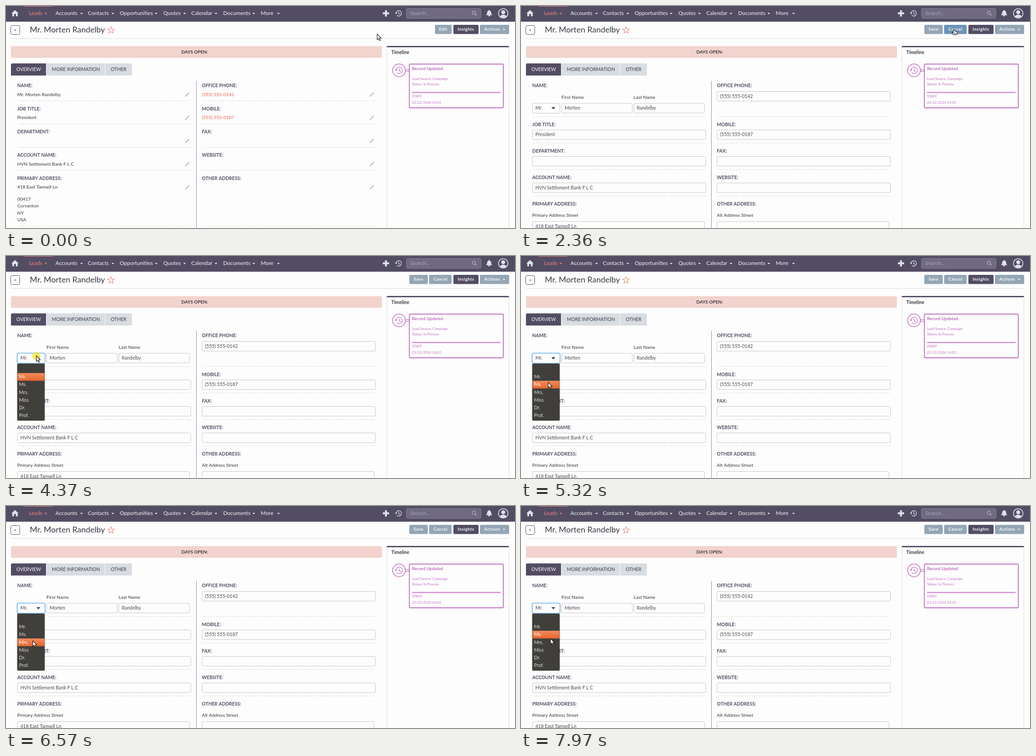
An HTML page with a canvas that plays this animation: 1132 by 495 pixels, repeating every 8 s.

```html
<!DOCTYPE html>
<html lang="en">
<head>
<meta charset="utf-8">
<title>Lead record</title>
<style>
html, body { margin: 0; width: 100%; height: 100%; overflow: hidden; background: #fdfdfd; }
canvas { display: block; width: 1132px; height: 495px; }
</style>
</head>
<body>
<canvas id="stage"></canvas>
<script>
const W = 1132, H = 495, LOOP = 8000;
const canvas = document.getElementById('stage');
const c = canvas.getContext('2d');
const dpr = window.devicePixelRatio || 1;
canvas.width = W * dpr;
canvas.height = H * dpr;

const PAGE = '#fdfdfd', DARK = '#534d64', TEXT = '#36343c', CORAL = '#f08377';
const GREY = '#94a6b5', HOVER = '#6c94b8', PURPLE = '#c06cbf', LIGHT = '#dfe1ea';
const FIRST = 'Morten', LAST = 'Randelby', FULL = `Mr. ${FIRST} ${LAST}`;
const OFFICE = '(555) 555-0142', MOBILE = '(555) 555-0187';
const COMPANY = 'HVN Settlement Bank F L C', STREET = '418 East Tamsell Ln';

const EDIT_AT = 2360, OPEN_AT = 4370;
const CLICKS = [[1620, 1670], [4340, 4450]];
const LIST_TOP = 243.8, ROW = 17.2;
const TITLES = ['', 'Mr.', 'Ms.', 'Mrs.', 'Miss', 'Dr.', 'Prof.'];

// Pointer keys: time, x, y
const PATH = [
  [1000, 825, 62], [1040, 829, 62], [1080, 854, 61], [1120, 878, 61], [1160, 889, 60],
  [1230, 914, 57], [1310, 934, 55], [1390, 951, 53], [1460, 963, 52],
  [2940, 963, 52], [3000, 938, 56], [3060, 860, 67], [3100, 769, 82], [3150, 626, 120],
  [3180, 586, 130], [3210, 503, 143], [3300, 412, 160], [3400, 317, 175],
  [3500, 230, 188], [3600, 160, 200], [3740, 98, 210], [4040, 67, 222],
  [4750, 67, 222], [5000, 64, 250], [5320, 60, 281],
  [5850, 60, 281], [6200, 61, 348], [6280, 61, 348], [6570, 59, 300], [6650, 60, 286],
  [6860, 62, 267], [6920, 62, 267], [7480, 65, 348], [7530, 65, 350], [7970, 65, 295]
];

function pointerAt(t) {
  const i = PATH.findIndex(k => k[0] > t);
  if (i === 0) return PATH[0].slice(1);
  if (i < 0) return PATH[PATH.length - 1].slice(1);
  const [t0, x0, y0] = PATH[i - 1], [t1, x1, y1] = PATH[i];
  const f = (t - t0) / (t1 - t0);
  return [Math.round(x0 + (x1 - x0) * f), Math.round(y0 + (y1 - y0) * f)];
}

// Text is placed by the middle of its capitals
function text(str, x, cy, size = 10.34, color = TEXT, style = '', gap = 0) {
  c.font = `${style} ${size}px Lato, "Open Sans", sans-serif`;
  c.letterSpacing = gap + 'px';
  c.fillStyle = color;
  c.fillText(str, x, cy + size * 0.36);
}

function box(x, y, w, h, r, fill, stroke, lw = 1) {
  c.beginPath();
  c.roundRect(x, y, w, h, r);
  if (fill) { c.fillStyle = fill; c.fill(); }
  if (stroke) { c.strokeStyle = stroke; c.lineWidth = lw; c.stroke(); }
}

function rect(x, y, w, h, color) {
  c.fillStyle = color;
  c.fillRect(x, y, w, h);
}

function disc(x, y, r, color) {
  c.beginPath();
  c.arc(x, y, r, 0, 7);
  c.fillStyle = color;
  c.fill();
}

function line(points, color, lw = 1) {
  c.beginPath();
  points.forEach(p => c.lineTo(...p));
  c.strokeStyle = color;
  c.lineWidth = lw;
  c.stroke();
}

function poly(points, fill, stroke, lw = 1) {
  c.beginPath();
  points.forEach(p => c.lineTo(...p));
  c.closePath();
  if (fill) { c.fillStyle = fill; c.fill(); }
  if (stroke) { c.strokeStyle = stroke; c.lineWidth = lw; c.stroke(); }
}

function caret(x, y, color, w = 6, h = 3.2) {
  poly([[x - w / 2, y - h / 2], [x + w / 2, y - h / 2], [x, y + h / 2]], color);
}

function historyIcon(x, y, r, color, lw) {
  c.beginPath();
  c.arc(x, y, r, -2.9, 2.4);
  c.strokeStyle = color;
  c.lineWidth = lw;
  c.stroke();
  poly([[x - r - 2.6, y - 1.6], [x - r + 2.6, y - 1.6], [x - r, y + 1.8]], color);
  line([[x, y - r * 0.55], [x, y + 0.6], [x + r * 0.5, y + r * 0.4]], color, lw);
}

function dots(x, y) {
  c.setLineDash([1, 4]);
  line([[x, y], [x + 382, y]], '#8a8a8e');
  c.setLineDash([]);
}

function pencil(x, y) {
  line([[x - 3.5, y + 3.5], [x + 2, y - 2]], '#b9b9bd', 2.2);
  line([[x + 2.4, y - 2.4], [x + 4, y - 4]], '#a5a5aa', 2.2);
  line([[x - 4.5, y + 4.5], [x - 3, y + 3]], '#8f8f95', 1);
}

function input(x, y, w, value = '') {
  box(x + 0.5, y + 0.5, w - 1, 21.5, 2.5, PAGE, '#c6c6ca');
  text(value, x + 7, y + 11, 10.5, '#4a4850');
}

function button(label, x, w, tx, color) {
  box(x, 42, w, 20.5, 2.5, color);
  text(label, tx, 52, 9.6, '#fafafa', 'bold', 0.45);
}

function navBar() {
  rect(0, 0, W, 35, DARK);
  rect(39, 0, 65, 1, CORAL);
  poly([[12, 16.5], [20, 9], [28, 16.5], [26, 16.5], [26, 23], [22, 23], [22, 18],
    [18, 18], [18, 23], [14, 23], [14, 16.5]], LIGHT);
  const items = [['Leads', 51, 88.5], ['Accounts', 110, 168], ['Contacts', 182, 237.5],
    ['Opportunities', 253, 334], ['Quotes', 350, 397], ['Calendar', 412, 467],
    ['Documents', 483, 551], ['More', 566.5, 606]];
  items.forEach(([label, x, cx], i) => {
    const color = i ? '#f5f5f7' : CORAL;
    text(label, x, 16, 12, color);
    caret(cx, 17, color);
  });
  rect(838, 14.2, 14, 4.2, LIGHT);
  rect(842.9, 9.5, 4.2, 14, LIGHT);
  historyIcon(873.5, 16.5, 6, LIGHT, 1.4);
  box(890.5, 5.5, 166, 22, 3, '#6f6a80', '#858095');
  text('Search...', 899, 16, 12, '#aaa6b5');
  c.beginPath();
  c.arc(1040.5, 15, 3.6, 0, 7);
  c.strokeStyle = '#aaa6b5';
  c.lineWidth = 1.6;
  c.stroke();
  line([[1043, 17.8], [1046.5, 21]], '#aaa6b5', 2);
  // bell
  c.beginPath();
  c.moveTo(1067.5, 20.5);
  c.quadraticCurveTo(1070, 18.5, 1070, 15);
  c.bezierCurveTo(1070, 8.5, 1079, 8.5, 1079, 15);
  c.quadraticCurveTo(1079, 18.5, 1081.5, 20.5);
  c.closePath();
  c.fillStyle = LIGHT;
  c.fill();
  disc(1074.5, 10.3, 1.3, LIGHT);
  disc(1074.5, 21.6, 1.8, LIGHT);
  // account badge
  disc(1105.8, 16.5, 11.3, LIGHT);
  disc(1105.8, 16.5, 9.7, DARK);
  c.save();
  c.beginPath();
  c.arc(1105.8, 16.5, 9.7, 0, 7);
  c.clip();
  disc(1105.8, 13.8, 4.4, LIGHT);
  c.beginPath();
  c.ellipse(1105.8, 25.2, 7.8, 6, 0, 0, 7);
  c.fill();
  c.restore();
}

function header(t, [px, py]) {
  box(10.5, 43.5, 20, 20, 3, PAGE, DARK);
  text('<', 17.3, 53, 10.3, DARK, 'bold');
  text(FULL, 53, 52.5, 17.9, '#3a3842');
  const star = [];
  for (let i = 0; i < 10; i++) {
    const r = i % 2 ? 3.3 : 7.8, a = i * Math.PI / 5 - Math.PI / 2;
    star.push([233.5 + r * Math.cos(a), 54 + r * Math.sin(a)]);
  }
  poly(star, null, CORAL, 1.1);
  rect(11, 72, 1108, 1, '#dcdce0');

  const live = t < EDIT_AT ? [['Edit', 954, 37, 963]]
    : [['Save', 897, 41, 906.5], ['Cancel', 941, 50, 950.5]];
  let over = false;
  live.forEach(([label, x, w, tx]) => {
    const hit = px >= x && px < x + w && py >= 42 && py < 62.5;
    over = over || hit;
    button(label, x, w, tx, hit ? HOVER : GREY);
  });
  button('Insights', 995, 56, 1004.5, DARK);
  button('Actions', 1054, 65, 1063.5, GREY);
  caret(1107.5, 52.5, '#fafafa', 5, 2.8);
  return over;
}

function timeline() {
  rect(846.5, 92, 1, H - 92, '#dcdce2');
  rect(1118, 92, 1, H - 92, '#dcdce2');
  box(846.5, 89, 272.5, 3, [3, 3, 0, 0], DARK);
  text('Timeline', 857, 103.5, 10.4, '#3a3842', 'bold');
  c.beginPath();
  c.arc(874, 143.5, 14.2, 0, 7);
  c.strokeStyle = PURPLE;
  c.lineWidth = 1.5;
  c.stroke();
  historyIcon(874.5, 143.5, 7.2, PURPLE, 1.2);
  line([[888, 142], [897, 142]], PURPLE, 1.3);
  line([[888, 145.6], [897, 145.6]], PURPLE, 1.3);
  box(897, 129.5, 209, 97.5, 2, null, PURPLE, 1.8);
  text('Record Updated', 903, 140, 9.6, PURPLE, 'bold');
  text('Lead Source: Campaign', 903, 162, 7.8, PURPLE);
  text('Status: In Process', 903, 174, 7.8, PURPLE);
  rect(903, 191.6, 197, 2.6, '#d08fd0');
  text('STAFF', 903, 201.5, 7.8, PURPLE);
  text('03/22/2024 14:03', 903, 215.5, 7.8, PURPLE, 'italic');
}

function panelTop() {
  box(11, 89.5, 825, 26, 3, '#f2d3cd');
  text('DAYS OPEN:', 390, 102, 10.2, '#3d3a45', 'bold');
  box(11, 128, 78, 27, [3, 0, 0, 0], DARK);
  text('OVERVIEW', 23, 141, 10.5, '#fafafa');
  rect(90, 128, 130, 27, '#d8dde1');
  text('MORE INFORMATION', 102, 141, 10.5, '#3d3a45');
  box(221, 128, 59, 27, [0, 3, 0, 0], '#d8dde1');
  text('OTHER', 233, 141, 10.5, '#3d3a45');
  rect(423, 167, 1, H - 167, '#8d8b95');
}

const LABELS = [['NAME:', 'OFFICE PHONE:'], ['JOB TITLE:', 'MOBILE:'],
  ['DEPARTMENT:', 'FAX:'], ['ACCOUNT NAME:', 'WEBSITE:'],
  ['PRIMARY ADDRESS:', 'OTHER ADDRESS:']];

function labels(i, y) {
  text(LABELS[i][0], 25, y, 10.4, DARK, 'bold');
  text(LABELS[i][1], 435.5, y, 10.4, DARK, 'bold');
}

function viewForm() {
  const left = [FULL, 'President', '', COMPANY, STREET];
  const right = [OFFICE, MOBILE];
  for (let i = 0; i < 5; i++) {
    const y = 177.3 + i * 51.7;
    labels(i, y);
    text(left[i], 25, y + 19.5);
    text(right[i] || '', 435.5, y + 19.5, 10.34, '#e8604f');
    pencil(403, y + 20.2);
    pencil(813.5, y + 20.2);
    const rule = i < 4 ? Math.round(y + 34) + 0.5 : 490.5;
    dots(29, rule);
    dots(439, rule);
  }
  ['00417', 'Corvanton', 'NY', 'USA'].forEach((s, i) => text(s, 25, 430.5 + i * 15.2));
}

function editForm(open, focus) {
  const ys = [177.3, 264, 323, 382, 441];
  ys.forEach((y, i) => {
    labels(i, y);
    if (i < 4) {
      const rule = [246, 305, 364, 423][i] + 0.5;
      dots(29, rule);
      dots(439, rule);
    }
  });
  text('First Name', 90, 203);
  text('Last Name', 250.5, 203);
  input(90, 216.5, 158, FIRST);
  input(250.5, 216.5, 158, LAST);
  input(25, 275.7, 386.5, 'President');
  input(25, 335, 386.5);
  input(25, 394, 386.5, COMPANY);
  input(435.5, 190, 386.5, OFFICE);
  input(435.5, 275.7, 386.5, MOBILE);
  input(435.5, 335, 386.5);
  input(435.5, 394, 386.5);
  text('Primary Address Street', 25, 466.5, 10.2);
  text('Alt Address Street', 435.5, 466.5, 10.2);
  input(25, 480, 383.5, STREET);
  input(435.5, 480, 383.5);
  if (focus) box(24.5, 216.5, 62.5, 23, 3, null, '#b5d8f8', 2.6);
  box(25.5, 217, 61, 22, 2.5, PAGE, focus ? '#6aaee8' : '#c6c6ca');
  text('Mr.', 32, 227.5, 10.5, '#4a4850');
  caret(72, 228, '#454349', 9, 5);
}

function dropdown(picked) {
  c.save();
  c.shadowColor = 'rgba(0,0,0,.35)';
  c.shadowBlur = 3 * dpr;
  box(25, 240, 61, 127, 2, '#403f3b');
  c.restore();
  const top = LIST_TOP + picked * ROW;
  const g = c.createLinearGradient(0, top, 0, top + ROW);
  g.addColorStop(0, '#f58a5b');
  g.addColorStop(1, '#e6662f');
  rect(25.5, top, 60, ROW, g);
  TITLES.forEach((s, i) => {
    text(s, 29, LIST_TOP + (i + 0.5) * ROW - 0.2, 10.6, i === picked ? '#fff' : '#dedcd5');
  });
}

function arrow(x, y) {
  const shape = [[0, 0], [0, 12.6], [2.9, 10], [4.9, 14.6], [7, 13.7], [5, 9.2], [8.8, 9]];
  poly(shape.map(p => [x + 0.5 + p[0], y + 0.5 + p[1]]), '#fff', '#111', 1.1);
}

function hand(x, y) {
  const shape = [[-1.2, 0], [0.6, 0], [1.2, 1], [1.2, 4], [3, 4], [5.4, 4.8], [6.6, 6],
    [6.6, 9], [5.2, 11.8], [-1.6, 11.8], [-5, 7.6], [-4.4, 6.4], [-2, 7.4], [-2, 1]];
  poly(shape.map(p => [x + 0.5 + p[0], y + p[1]]), '#fff', '#111', 1.2);
  [0.2, 2.2, 4.2].forEach(d => line([[x + d, y + 7.5], [x + d, y + 10]], '#111', 0.8));
}

function draw(t) {
  const pos = pointerAt(t);
  const editing = t >= EDIT_AT, open = t >= OPEN_AT;
  c.setTransform(dpr, 0, 0, dpr, 0, 0);
  rect(0, 0, W, H, PAGE);
  navBar();
  const over = header(t, pos);
  panelTop();
  timeline();
  if (editing) editForm(open, t >= CLICKS[1][0]);
  else viewForm();
  if (open) {
    const row = Math.floor((pos[1] - LIST_TOP) / ROW);
    dropdown(row < 0 ? 1 : Math.min(row, 6));
  }
  if (CLICKS.some(([a, b]) => t >= a && t < b)) {
    disc(pos[0] + 0.3, pos[1] + 1, 9, 'rgba(240,228,40,.75)');
  }
  (over ? hand : arrow)(...pos);
}

let start;
function tick(now) {
  if (start === undefined) start = now;
  draw((now - start) % LOOP);
  requestAnimationFrame(tick);
}
draw(0);
requestAnimationFrame(tick);
</script>
</body>
</html>
```
